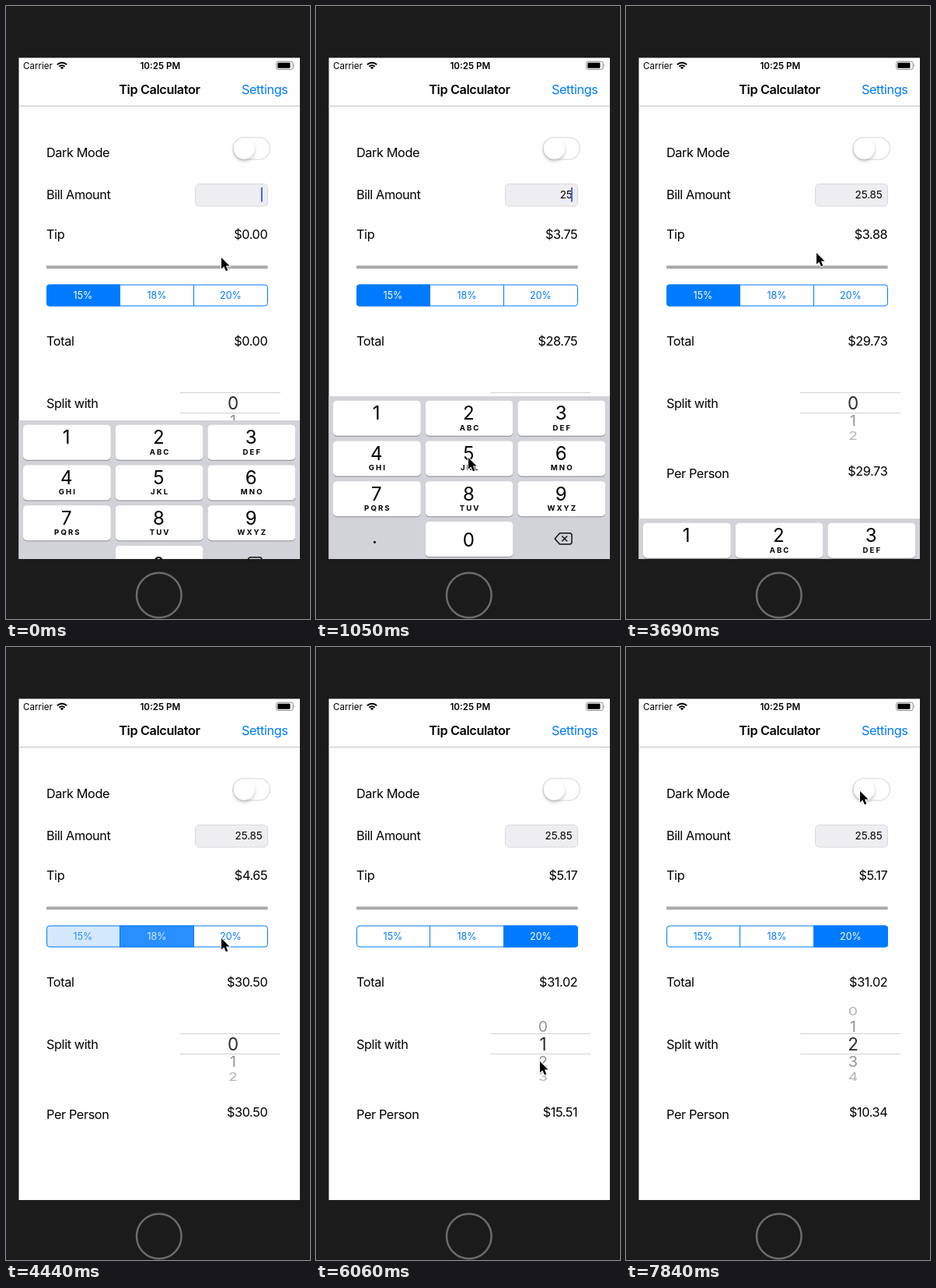
These frames come from a looping animation (391 px wide and 787 px high, 7990 ms). An HTML page:

```html
<!DOCTYPE html>
<html lang="en">
<head>
<meta charset="utf-8">
<title>Tip Calculator</title>
<style>
  html, body { margin: 0; width: 100%; height: 100%; overflow: hidden; background: #1b1b1b; }
  svg { display: block; width: 100%; height: 100%; }
  text { font: 16.3px Inter, "Liberation Sans", sans-serif; letter-spacing: -.4px; fill: #000; white-space: pre; }
  .end { text-anchor: end; }
  .mid { text-anchor: middle; }
  .blue { fill: #007aff; }
  .title { font-weight: 600; }
  .status { font-size: 11.6px; letter-spacing: 0; }
  .bill { font-size: 13.5px; letter-spacing: -.15px; }
  .option { font-size: 12.5px; letter-spacing: 0; }
  .digit { font-size: 24px; letter-spacing: 0; }
  .letters { font-size: 9.6px; font-weight: 700; letter-spacing: 2.1px; }
  .row { letter-spacing: 0; fill: #000; }
</style>
</head>
<body>
<svg viewBox="0 0 391 787">
  <defs>
    <clipPath id="screenClip"><rect x="16.5" y="66.5" width="361.5" height="643.5"/></clipPath>
    <clipPath id="segmentClip"><rect x="52" y="357.5" width="285" height="28" rx="4"/></clipPath>
    <clipPath id="wheelClip"><rect x="224" y="461.5" width="129" height="95.5"/></clipPath>
    <filter id="knobShadow" x="-50%" y="-50%" width="200%" height="200%">
      <feDropShadow dx="0" dy="2.5" stdDeviation="2" flood-opacity=".24"/>
    </filter>
  </defs>
  <rect width="391" height="787" fill="#1b1b1b"/>
  <circle cx="196.8" cy="756.5" r="28.8" fill="none" stroke="#6c6c6c" stroke-width="2.5"/>

  <g clip-path="url(#screenClip)">
    <rect x="16" y="66" width="363" height="645" fill="#fefefe"/>

    <text class="status" x="22" y="80.5">Carrier</text>
    <g fill="none" stroke="#000" stroke-width="2">
      <path d="M65.9 75.2a8.6 8.6 0 0 1 12.2 0M68.4 77.7a5.1 5.1 0 0 1 7.2 0"/>
      <path d="M72 81.3l-2.1-2.2a3 3 0 0 1 4.2 0z" fill="#000" stroke="none"/>
    </g>
    <text class="status title mid" x="198.3" y="80.5">10:25 PM</text>
    <rect x="347.7" y="71.2" width="21.5" height="10.2" rx="2.4" fill="none" stroke="#8a8a8a"/>
    <rect x="349.3" y="72.8" width="16.2" height="7" rx="1"/>
    <path d="M370.5 74.6q1.8 1.7 0 3.5z" fill="#8a8a8a"/>

    <text class="title mid" x="197.4" y="113">Tip Calculator</text>
    <text class="blue end" x="362.5" y="113">Settings</text>
    <path d="M16 128.5H379" stroke="#c4c4c6"/>

    <text x="52" y="193.5">Dark Mode</text>
    <text x="52" y="247.5">Bill Amount</text>
    <text x="52" y="298.7">Tip</text>
    <text x="52" y="435.5">Total</text>
    <text x="52" y="515.5">Split with</text>
    <text x="52" y="605.5">Per Person</text>

    <rect x="292" y="168.7" width="47.5" height="28.3" rx="14.15" fill="#fefefe" stroke="#e4e4e4" stroke-width="1.6"/>
    <circle cx="306.3" cy="183" r="13.4" fill="#fff" filter="url(#knobShadow)"/>

    <rect x="243.5" y="228.5" width="93" height="28.5" rx="5" fill="#eeeef2" stroke="#d9d9dc"/>
    <text id="bill" class="bill end" x="329.7" y="247.3"></text>
    <rect id="caret" x="328" y="233" width="2" height="18.5" fill="#4a63e6"/>

    <text id="tip" class="end" x="336.3" y="298.5"></text>
    <rect x="52" y="333.3" width="284.7" height="4" fill="#aaa"/>

    <g id="segments" clip-path="url(#segmentClip)"></g>
    <rect x="52.5" y="358" width="284" height="27" rx="3.6" fill="none" stroke="#007aff"/>
    <path d="M146.5 358V385M241.5 358V385" stroke="#007aff"/>

    <text id="total" class="end" x="336.3" y="435.5"></text>
    <path d="M224 496.5H353M224 522.5H353" stroke="#d2d2d2"/>
    <g id="wheel" clip-path="url(#wheelClip)"></g>
    <text id="share" class="end" x="336.3" y="603"></text>

    <g id="keyboard"></g>
  </g>
  <path id="pointer" d="M0 0V14.6L3.4 11.4 5.9 17.2 8.3 16.2 5.9 10.6H10.5Z" stroke="#fff" stroke-width="1.8" paint-order="stroke"/>
</svg>

<script>
const STEP = 148, STEPS = 54;
const $ = id => document.getElementById(id);

// All times below are counted in screen updates of STEP ms.
const pointerPath = [
  [0, 277, 323], [1, 268, 350], [3, 205, 500], [4, 198, 535], [6, 196, 580], [7, 196, 580],
  [8, 180, 602], [10, 84, 687], [11, 84, 687], [13, 195, 640], [14, 195, 640],
  [16, 194, 588], [18, 194, 588], [23, 245, 317], [25, 245, 317], [28, 196, 371],
  [29, 196, 371], [30, 277, 374], [33, 277, 374], [36, 284, 550], [38, 288, 532],
  [41, 288, 532], [42, 288, 546], [44, 289, 520], [45, 290, 518], [48, 340, 340],
  [51, 312, 157], [53, 301, 185]
];
const keyboardPath = [[0, 31], [1, 6], [2, 0], [24, 0], [25, 157], [26, 215]];
const wheelPath = [[36, 0], [38, .8], [40, 1], [42, 1], [44, 1.8], [46, 2]];
const typed = [[0, ''], [5, '2'], [7, '25'], [11, '25.'], [14, '25.8'], [17, '25.85']];
const presses = { 4: '2', 6: '5', 13: '8', 16: '5' };
const fades = [[29.2, 0, 1], [32.8, 1, 2]];
const rates = [.15, .18, .2];

const clamp = v => Math.min(1, Math.max(0, v));

function track(points, time) {
  const next = points.findIndex(p => p[0] > time);
  if (next < 0) return points.at(-1).slice(1);
  if (next === 0) return points[0].slice(1);
  const a = points[next - 1], b = points[next];
  const k = (time - a[0]) / (b[0] - a[0]);
  return a.slice(1).map((v, i) => v + (b[i + 1] - v) * k);
}

const edges = [52, 146.5, 241.5, 337];
$('segments').innerHTML = rates.map((rate, i) => `
  <rect x="${edges[i]}" y="357" width="${edges[i + 1] - edges[i]}" height="29" fill="#007aff"/>
  <text class="option mid" x="${99 + 95 * i}" y="376">${rate * 100}%</text>`).join('');
const fills = [...$('segments').querySelectorAll('rect')];
const options = [...$('segments').querySelectorAll('text')];

$('wheel').innerHTML = [0, 1, 2, 3, 4].map(n => `<text class="row mid">${n}</text>`).join('');
const rows = [...$('wheel').children];

function keyMarkup(digit, letters, col, row) {
  const x = 22 + 118.7 * col, y = 506.7 + 51.8 * row, middle = x + 56.4;
  const baseline = y + (letters === null ? 31.5 : 24.5);
  return `<rect x="${x}" y="${y + 1}" width="112.8" height="45" rx="5" fill="#898b8f"/>
    <rect id="key${digit}" x="${x}" y="${y}" width="112.8" height="45" rx="5"/>
    <text class="digit mid" x="${middle - .7}" y="${baseline}">${digit}</text>
    <text class="letters mid" x="${middle + 1}" y="${y + 37.8}">${letters || ''}</text>`;
}
const groups = ['', 'ABC', 'DEF', 'GHI', 'JKL', 'MNO', 'PQRS', 'TUV', 'WXYZ'];
$('keyboard').innerHTML = `<rect x="16" y="501" width="363" height="215" fill="#d2d3d9"/>`
  + groups.map((letters, i) => keyMarkup(i + 1, letters, i % 3, Math.floor(i / 3))).join('')
  + keyMarkup(0, null, 1, 3)
  + `<text class="digit mid" x="75.5" y="690">.</text>
     <path d="M313.5 676.7H326a3 3 0 0 1 3 3V688a3 3 0 0 1-3 3H313.5L307.2 683.9ZM316.3 680.5l6.8 6.8m0-6.8l-6.8 6.8"
       fill="none" stroke="#111" stroke-width="1.5" stroke-linejoin="round"/>`;

function drawWheel(position) {
  rows.forEach((row, n) => {
    const offset = n - position, distance = Math.abs(offset);
    const angle = offset * Math.PI / 9;
    const size = distance < .5 ? 22.5 : 19.5;
    const y = 509.8 + 65 * Math.sin(angle);
    row.setAttribute('transform', `translate(292 ${y}) scale(1 ${Math.cos(angle)})`);
    row.setAttribute('y', size * .364);
    row.style.fontSize = size + 'px';
    row.style.opacity = distance < .5 ? .82 : distance < 2.6 ? .55 - .13 * distance : 0;
  });
}

function drawSegments(step) {
  const levels = [1, 0, 0];
  for (const [start, from, to] of fades) {
    const k = clamp((step - start) * 1.05);
    if (step >= start) {
      levels[from] = 1 - k;
      levels[to] = k;
    }
  }
  levels.forEach((level, i) => {
    fills[i].style.opacity = level;
    options[i].style.fill = `color-mix(in srgb, #fff ${level * 100}%, #007aff)`;
  });
}

function draw(step) {
  const [since, bill] = typed.findLast(entry => entry[0] <= step);
  const chosen = fades.filter(fade => fade[0] <= step).length;
  const [position] = track(wheelPath, step);
  const tip = bill * rates[chosen], total = +bill + tip;
  const money = value => '$' + value.toFixed(2);

  $('bill').textContent = bill;
  $('tip').textContent = money(tip);
  $('total').textContent = money(total);
  $('share').textContent = money(total / (Math.floor(position) + 1));
  $('caret').style.opacity = step < 25 && (step - since) % 6 < 4 ? 1 : 0;

  for (let n = 0; n < 10; n++) {
    $('key' + n).style.fill = presses[step] === String(n) ? '#b4c0cc' : '#fefefe';
  }
  $('keyboard').setAttribute('transform', `translate(0 ${track(keyboardPath, step)[0]})`);
  $('pointer').setAttribute('transform', `translate(${track(pointerPath, step).join(' ')})`);
  drawSegments(step);
  drawWheel(position);
}

const start = performance.now();
function tick() {
  const time = (performance.now() - start) % 7990;
  draw(Math.min(STEPS - 1, Math.floor(time / STEP + .1)));
  requestAnimationFrame(tick);
}
tick();
</script>
</body>
</html>
```
